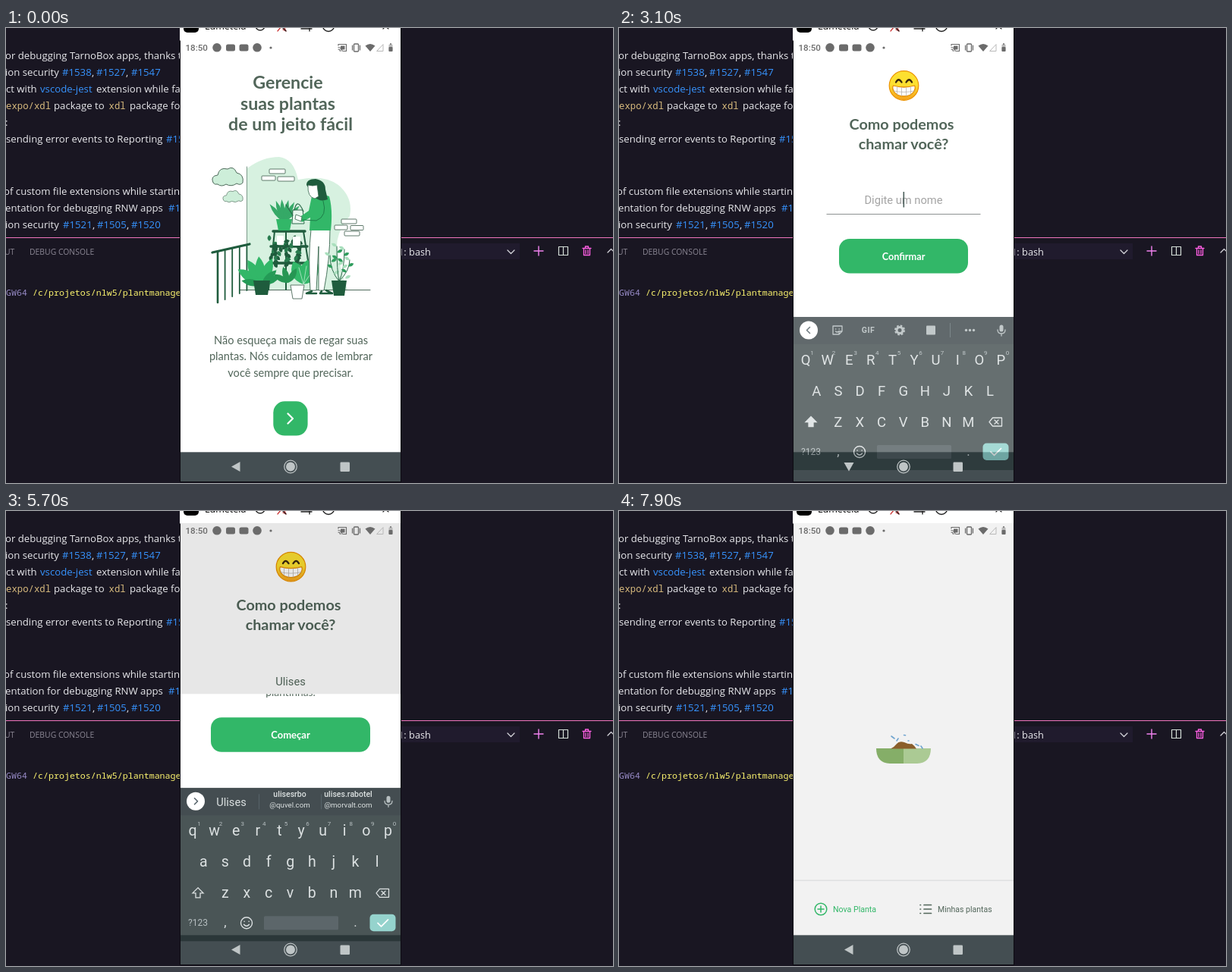
Write an HTML page that moves like this. It is 800 px wide and 600 px high and loops after 8000 ms.

```html
<!DOCTYPE html>
<html lang="pt-BR">
<head>
<meta charset="utf-8">
<title>Plant manager demo</title>
<style>
html, body { margin: 0; width: 100%; height: 100%; overflow: hidden; background: #191622; }
svg { display: block; width: 800px; height: 600px; }
.ui { font-family: "Open Sans", "Noto Sans", sans-serif; }
.mono { font-family: "Noto Sans Mono", monospace; }
.title { font-family: Lato, sans-serif; font-weight: 700; }
.body { font-family: Lato, sans-serif; }
.rob { font-family: Roboto, sans-serif; }
.mid { text-anchor: middle; }
.bold { font-weight: 700; }
.line { fill: none; stroke-linecap: round; stroke-linejoin: round; }
</style>
</head>
<body>
<svg id="stage" viewBox="0 0 800 600"></svg>
<script>
const NAME = 'Ulises';
const GREEN = '#32b768', INK = '#52665a', DARK = '#1f5c3d', LINK = '#3794ff', CODE = '#d7ba7d';
const $ = id => document.getElementById(id);

const text = (x, y, size, str, cls, fill, more = '') =>
  `<text x="${x}" y="${y}" font-size="${size}" class="${cls}" fill="${fill}" ${more}>${str}</text>`;
const rect = (x, y, w, h, fill, r = 0, more = '') =>
  `<rect x="${x}" y="${y}" width="${w}" height="${h}" rx="${r}" fill="${fill}" ${more}/>`;
const disc = (x, y, r, fill, more = '') => `<circle cx="${x}" cy="${y}" r="${r}" fill="${fill}" ${more}/>`;
const shape = (d, fill, more = '') => `<path d="${d}" fill="${fill}" ${more}/>`;
const line = (d, color, w = 1) => `<path d="${d}" class="line" stroke="${color}" stroke-width="${w}"/>`;
const group = (id, inner, more = '') => `<g id="${id}" ${more}>${inner}</g>`;
const button = (id, x, y, w, label, size, base) => group(id,
  rect(x, y, w, 45.5, GREEN, 14) + text(375, base, size, label, 'title mid', '#fff'));

function editor() {
  const white = '#e8e8ec', parts = [
    [-1, 41, 'or debugging TarnoBox apps, thanks to'],
    [-1, 63, 'ion security'], [74, 63, '#1538', LINK], [113, 63, ','], [119, 63, '#1527', LINK],
    [158, 63, ','], [165, 63, '#1547', LINK],
    [0, 85, 'ct with'], [45, 85, 'vscode-jest', LINK], [119, 85, 'extension while fa'],
    [63, 107, 'package to'], [163, 107, 'package for'], [-1, 129, ':'],
    [0, 151, 'sending error events to Reporting'], [211, 151, '#1531', LINK],
    [-3, 220, 'of custom file extensions while starting'],
    [-1, 242, 'entation for debugging RNW apps'], [214, 242, '#1513', LINK],
    [-1, 264, 'ion security'], [75, 264, '#1521', LINK], [114, 264, ','], [120, 264, '#1505', LINK],
    [159, 264, ','], [165, 264, '#1520', LINK]];
  return rect(0, 0, 800, 600, '#191622')
    + parts.map(([x, y, s, c = white]) => text(x, y, 13.2, s, 'ui', c)).join('')
    + text(0, 107, 12.3, 'expo/xdl', 'mono', CODE) + text(135.5, 107, 12.3, 'xdl', 'mono', CODE)
    + rect(0, 276, 800, 1, '#f075bd')
    + text(-2, 299, 10.4, 'UT', 'ui', '#8b8794') + text(31, 299, 10.4, 'DEBUG CONSOLE', 'ui', '#8b8794')
    + text(0, 353, 11.65, 'GW64', 'mono', '#988bc7')
    + text(35, 353, 11.65, '/c/projetos/nlw5/plantmanager', 'mono', '#fbf36e')
    + rect(500, 284, 177, 21, '#201b2d') + text(517, 300, 12.8, '1: bash', 'ui', white)
    + line('M661 293l4.5 4.5l4.5-4.5', '#d8d8de', 1.2)
    + line('M702 288v12M696 294h12', '#f283f0', 1.4)
    + line('M728.5 288.5h12v11h-12zM734.5 288.5v11', '#d5dfd9', 1.2)
    + line('M760 290.5h11M763.5 290v-2h4v2M761.5 291v8.5h8v-8.5M764 293v4.5M767 293v4.5', '#ff5fe4', 1.3)
    + line('M793 296l4.5-4.5l4.5 4.5', '#d8d8de', 1.2);
}

function windowBar() {
  return rect(229, 0, 292, 599, '#0d0b12') + rect(229, 0, 291, 16.5, '#fff') + rect(234, -12, 20, 18, '#000', 5)
    + text(262, 2, 12.5, 'Lumetela', 'ui', '#000')
    + disc(335, -3, 6, 'none', 'stroke="#222" stroke-width="1.4"')
    + line('M358 4l5-6M366-2l3 6l-4-2', '#c33', 1.3) + line('M363-2l6 6', '#222', 1.2)
    + line('M389 1h14M400-2v6', '#222', 1.4)
    + disc(425, -3, 7.5, 'none', 'stroke="#222" stroke-width="1.4"')
    + line('M497 1l3-3l4 3', '#222', 1.2);
}

function statusBar() {
  const g = '#6b6b6b';
  return text(236.5, 30.2, 11.6, '18:50', 'rob', g, 'font-weight="500"')
    + disc(278, 25.8, 5.8, g) + rect(290, 21.5, 12, 9, g, 2.5) + rect(307.5, 21.5, 12, 9, g, 2.5)
    + disc(331, 25.8, 5.8, g) + disc(349, 26, 1.6, g)
    + line('M438 23v-1.5h10.5v9h-4M438 25.5a5 5 0 0 1 5 5M438 28a2.5 2.5 0 0 1 2.5 2.5', g, 1.2)
    + rect(441, 23.5, 5.5, 5, g)
    + rect(458.5, 21, 6, 10, 'none', 1, `stroke="${g}" stroke-width="1.4"`)
    + line('M456.5 23v6M466.5 23v6', g, 1.2)
    + shape('M473.5 23.5Q480 18.5 486.5 23.5L480 31z', g)
    + line('M489 30.5h8v-8.5z', '#b9b9b9', 1)
    + rect(504.5, 21.5, 5, 9.5, '#bbb', 1) + rect(504.5, 25, 5, 6, g, 1) + rect(506, 20.3, 2, 1.5, g);
}

const leaf = (x, y, len, angle, w, fill) => shape(
  `M0 0Q${w} ${-len / 2} 0 ${-len}Q${-w} ${-len / 2} 0 0`, fill,
  `transform="translate(${x} ${y}) rotate(${angle})"`);
const fan = (x, y, len, w, fill, angles) => angles.map(a => leaf(x, y, len, a, w, fill)).join('');
const brick = (x, y, w) => rect(x, y, w, 6, '#fff', 1, 'stroke="#4f6b5c" stroke-width=".9"');
const cloud = (x, y, k) => shape('M-19 8Q-23-1-13-2Q-11-13 0-10Q8-15 12-5Q22-3 20 8Q17 12 12 9Q5 14-2 10Q-8 14-13 10Q-17 11-19 8z',
  '#cdeed9', `stroke="#4f6b5c" stroke-width="1" transform="translate(${x} ${y}) scale(${k})"`);

function illustration() {
  let s = shape('M318 345V185Q338 170 360 170Q379 172 385 200Q420 193 438 207Q458 224 453 248Q436 268 436 288Q440 318 450 345z', '#d7f1e0')
    + line('M317.5 183V345', '#7c9a8a', 1) + line('M308 345.5H480', '#4f6b5c', 1)
    + cloud(292, 196, 1) + cloud(299, 222, .65)
    + brick(347, 186, 21) + brick(337, 195, 18) + brick(358, 196, 22)
    + brick(442, 252, 20) + brick(433, 260, 17) + brick(454, 260.5, 17) + brick(446, 268, 20);
  // railing
  s += line('M272 296L321 285', DARK, 3.2);
  for (let i = 0; i < 5; i++) s += line(`M${279 + i * 9.6} ${295 - i * 2.2}V${362 - i * 4}`, DARK, i ? 1.8 : 2.6);
  // stand with plants
  s += line('M354 268L346 345M392 268L404 345M369 268V345', DARK, 2)
    + line('M352 268H394M349 288H397M348 310H400', DARK, 3.4)
    + fan(366, 256, 30, 6, '#35a967', [-38, -20, -5, 12, 28, 44])
    + shape('M356 252h21l-3 15h-15z', GREEN)
    + shape('M378 240h13l2 18h-16z', '#e9f7ee', 'stroke="#2b6a4a" stroke-width="1"')
    + line('M378 247l-9-14M380 240q4-17 12 2', '#2b6a4a', 1.2);
  for (let i = 0; i < 44; i++)
    s += leaf(347 + i * 17 % 45, 281 + i * 11 % 31, 8, i * 47, 5, i % 3 ? DARK : '#2a7d50');
  s += rect(357, 274, 9, 12, '#fff', 1) + rect(378, 275, 10, 12, '#fff', 1);
  // floor plants
  s += fan(337, 338, 37, 13, GREEN, [-58, -30, -6, 22]) + fan(337, 338, 27, 9, '#249a56', [-80, 46, 66])
    + shape('M326 333h22l-3 19h-16z', DARK)
    + fan(392, 338, 33, 17, GREEN, [-24, 10, 36]) + line('M392 338l-6-22M392 338l4-24M392 338l12-18', '#bdebce', .8)
    + fan(372, 336, 22, 8, '#269653', [-60, -18, 30])
    + shape('M375 339h18l-3 18h-12z', '#fff', 'stroke="#4f6b5c" stroke-width=".9"');
  // gardener
  s += shape('M402 266L427 266Q427 305 419 346L412 346L412 288L409 346L401 346Q398 300 402 266z', '#fff', 'stroke="#37664d" stroke-width=".9"')
    + line('M403 347l-7 3h13M416 347l-2 3h16l-8-4', DARK, 2.6)
    + shape('M403 222Q416 217 426 222Q431 240 428 267L400 267L401 250L390 256L386 250L399 241z', GREEN)
    + line('M418 228Q424 248 409 254L391 253', '#1d7d48', 1)
    + shape('M382 246l8 3-1 6-8-3z', '#fff', 'stroke="#37664d" stroke-width=".8"')
    + shape('M396 207Q396 199 408 199Q421 201 421 213L424 226Q414 230 407 223z', DARK)
    + shape('M398 207Q404 209 410 207L412 222L407 225Q397 223 398 207z', '#fff', 'stroke="#37664d" stroke-width=".8"');
  // flowering plant
  const stems = [[427, 300], [436, 288], [446, 292], [453, 306]];
  for (const [x, y] of stems) {
    s += line(`M439 334Q${x} 320 ${x} ${y}`, '#2b6a4a', 1);
    for (let i = 0; i < 4; i++)
      s += leaf(x + (439 - x) * i / 7, y + i * 8, 8, i % 2 ? 65 : -60, 4, i % 3 ? '#2f9d5d' : '#a9dfbd');
  }
  return s + shape('M429 333h20l-3 20h-14z', DARK);
}

const emoji = (x, y, r) => `<g transform="translate(${x} ${y}) scale(${r / 20})">`
  + disc(0, 0, 19.3, 'url(#face)', 'stroke="#eb9200" stroke-width="1.2"')
  + line('M-10.5-4.5Q-7-11-3-4.5M3-4.5Q7-11 10.5-4.5', '#3b270d', 2.3)
  + shape('M-14 0Q0 4 14 0Q16 3 13 8Q9 14 0 14Q-9 14-13 8Q-16 3-14 0z', '#fff', 'stroke="#e68f06" stroke-width="1.3"')
  + line('M-13.5 7Q0 10 13.5 7M-9 1.5v9.5M-3 2.5v11M3 2.5v11M9 1.5v9.5', '#b9b3ac', .8) + '</g>';

const welcome = () =>
  text(371.5, 80, 23.2, 'Gerencie', 'title mid', INK) + text(371.5, 107.5, 23.2, 'suas plantas', 'title mid', INK)
  + text(375, 134.5, 23.2, 'de um jeito fácil', 'title mid', INK) + illustration()
  + text(375.5, 417, 14.6, 'Não esqueça mais de regar suas', 'body mid', INK)
  + text(375.5, 438, 14.6, 'plantas. Nós cuidamos de lembrar', 'body mid', INK)
  + text(375, 459.5, 14.6, 'você sempre que precisar.', 'body mid', INK)
  + group('go', rect(352.3, 492.3, 45.3, 45.3, GREEN, 15) + line('M371.5 508.5l6.5 6.5l-6.5 6.5', '#fff', 2.2));

const askName = () => emoji(375.5, 177, 20)
  + text(372.5, 234.5, 19.8, 'Como podemos', 'title mid', INK) + text(375, 260.5, 19.8, 'chamar você?', 'title mid', INK)
  + text(375, 333, 14.7, '', 'rob mid', '#a4a4a4', 'id="field"')
  + rect(0, 317, 1.6, 20.5, '#008577', 0, 'id="caret"')
  + rect(273.5, 346, 203, 1, '#ccc', 0, 'id="rule"')
  + button('confirm', 290, 379, 170, 'Confirmar', 12.7, 407);

const ready = () => emoji(375.3, 211, 34.8)
  + text(375, 284, 17.1, 'Prontinho', 'title mid', INK)
  + text(375, 316, 13.8, 'Agora vamos começar a cuidar das suas', 'body mid', INK)
  + text(375, 335.5, 13.8, 'plantinhas.', 'body mid', INK)
  + button('start', 270, 364, 210, 'Começar', 13, 391.5);

const loading = () =>
  group('pot', shape('M339 313h36v20h-18Q339 332 339 313z', '#85ae68') + shape('M375 313h36Q411 332 393 333h-18z', '#abca94'))
  + group('soil', shape('M358 313.5Q363 311 366 307Q369 303 376 305Q382 308 386 307Q390 310 392 313.5z', '#8a5e2b'))
  + group('drops', line('M359 297l4 3M375.5 295.5l2 .3M366 303l2-3M391 307.5l4 2M398 310l2 3M381 303h1', '#6fa4cf', 1.6))
  + rect(230, 486.5, 290, 1.4, '#dedfe0')
  + disc(266, 525, 7.8, 'none', `stroke="${GREEN}" stroke-width="1.5"`) + line('M266 521v8M262 525h8', GREEN, 1.5)
  + text(282, 529, 10.6, 'Nova Planta', 'rob', GREEN)
  + [519.5, 525, 530.5].map(y => line(`M402 ${y}h9.5M397 ${y}h.5`, INK, 1.7)).join('')
  + text(420, 529, 10.5, 'Minhas plantas', 'rob', INK);

// keyboard, in its resting place
const keyRows = [['qwertyuiop', 246, 414], ['asdfghjkl', 260.3, 455], ['zxcvbnm', 288.8, 496]];
const PITCH = 28.6, KEY = '#d5dbdc';
function keyPlace(ch) {
  const [row, x, y] = keyRows.find(r => r[0].includes(ch));
  return [x + row.indexOf(ch) * PITCH, y];
}
const letters = up => keyRows.map(([row]) => [...row].map(ch => {
  const [x, y] = keyPlace(ch);
  return text(x, y + 6.5, up ? 18.5 : 19.5, up ? ch.toUpperCase() : ch, 'rob mid', KEY);
}).join('')).join('') + shape('M253 489.5l7 7h-4v6h-6v-6h-4z', up ? KEY : 'none', `stroke="${KEY}" stroke-width="1.3"`);
const toggle = d => disc(250, 375.5, 12, '#fff') + line(d, '#37474f', 1.6);

function keyboard() {
  const soft = '#a9b3b5';
  return rect(230, 358, 290, 202, '#263335') + rect(230, 358, 290, 36, '#1f2a2e')
    + group('tools', toggle('M251.5 371.5l-4 4l4 4')
      + line('M282 370h12v7l-4 4h-8zM294 377h-4v4M285.5 374h.3M290 374h.3M285.5 377q2 2 4 0', soft, 1.3)
      + text(328.5, 379.3, 10.5, 'GIF', 'rob mid bold', soft, 'letter-spacing=".5"')
      + disc(370, 375.5, 4, 'none', `stroke="${soft}" stroke-width="3"`)
      + disc(370, 375.5, 6, 'none', `stroke="${soft}" stroke-width="2" stroke-dasharray="2.6 2.112"`)
      + rect(405, 369.5, 12, 12, soft, 1) + rect(436, 366, 1, 19, '#46545a')
      + [457.5, 462.5, 467.5].map(x => disc(x, 375.5, 1.7, soft)).join(''))
    + group('words', toggle('M248.5 371.5l4 4l-4 4') + rect(333, 366, 1, 20, '#35444a') + rect(415, 366, 1, 20, '#35444a')
      + text(297, 382, 14.6, '', 'rob mid', KEY, 'id="left"') + text(374, 382, 14.4, '', 'rob mid bold', '#fff', 'id="best"')
      + group('mailA', mail('ulisesrbo', '@quvel.com')) + group('mailB', mail('ulises.rabotel', '@morvalt.com'), 'transform="translate(451)"'))
    + rect(501.5, 368.5, 5, 9, soft, 2.5) + line('M499 375q0 5 5 5q5 0 5-5M504 380v3', soft, 1.3)
    + [...'1234567890'].map((n, i) => text(254.5 + i * PITCH, 408, 8, n, 'rob mid', soft)).join('')
    + group('lower', letters(false)) + group('upper', letters(true))
    + line('M488 496.5l4.5-5.5h12v11h-12zM495 494l5 5M500 494l-5 5', KEY, 1.3)
    + text(253, 540, 12, '?123', 'rob mid', soft) + text(289, 541, 17, ',', 'rob mid', KEY) + text(460.5, 541, 17, '.', 'rob mid', KEY)
    + disc(317, 536, 7.5, 'none', `stroke="${KEY}" stroke-width="1.4"`)
    + line('M314 534h.2M320 534h.2M313.5 538q3.5 4 7 0', KEY, 1.5)
    + rect(340, 527, 98, 18, '#3c484c', 1.5)
    + rect(479.5, 524.5, 34, 22.5, '#80cbc4', 5) + line('M490 536l4.5 4.5l9-9', '#fff', 1.7)
    + group('pop', rect(-15, -73, 30, 90, '#3a484d', 3) + text(0, -41, 19.5, '', 'rob mid', '#fff', 'id="popKey"'));
}
function mail(user, host) {
  return text(0, 369.8, 10.5, user, 'rob mid', KEY, 'font-weight="500"') + text(0, 383.3, 9.7, host, 'rob mid', KEY);
}

const navIcons = () => {
  const c = '#bfc5c6';
  return group('back', shape('M-6 0L5.5-6.5V6.5z', c))
    + disc(375, 578.5, 8.3, 'none', `stroke="${c}" stroke-width="1.2"`) + disc(375, 578.5, 6, c)
    + rect(440.5, 572.5, 12.5, 12.5, c, 1.2);
};

const screen = (i, inner, bg) => `<g id="screen${i}" clip-path="url(#clip${i})">` + rect(230, 16, 290, 543, bg)
  + group('page' + i, inner) + rect(230, 16, 290, 543, '#000', 0, `id="dim${i}"`) + '</g>';

$('stage').innerHTML = '<defs><linearGradient id="face" x2="0" y2="1"><stop offset=".45" stop-color="#fde030"/><stop offset="1" stop-color="#f5a11c"/></linearGradient>'
  + [0, 1, 2, 3].map(i => `<clipPath id="clip${i}"><rect id="win${i}" x="230" y="16" width="290" height="543"/></clipPath>`).join('') + '</defs>'
  + editor() + windowBar() + rect(230, 16, 290, 544, '#fff')
  + screen(0, welcome(), '#fff') + screen(1, askName(), '#fff') + screen(2, ready(), '#fff') + screen(3, loading(), '#f2f2f2')
  + statusBar() + rect(230, 559.3, 290, 38.7, '#444e52') + group('keyboard', keyboard()) + navIcons();

const set = (id, name, value) => $(id).setAttribute(name, value);
const show = (id, on) => set(id, 'display', on ? 'inline' : 'none');
const clamp = v => Math.max(0, Math.min(1, v));

// cubic-bezier(.20833, .82, .25, 1)
function ease(x) {
  if (x <= 0 || x >= 1) return clamp(x);
  const curve = (s, a, b) => 3 * a * s * (1 - s) ** 2 + 3 * b * s * s * (1 - s) + s ** 3;
  let lo = 0, hi = 1;
  for (let i = 0; i < 24; i++) {
    const mid = (lo + hi) / 2;
    if (curve(mid, .20833, .25) < x) lo = mid; else hi = mid;
  }
  return curve(lo, .82, 1);
}

// a button held between two times; its face and label fade separately
function press(id, t, down, up) {
  const alpha = t < up ? 1 - .8 * clamp((t - down) / 100) : .2 + .8 * clamp((t - up) / 250);
  for (const part of $(id).children) part.setAttribute('opacity', alpha);
}

const stalls = [[5100, 5300], [5700, 6200], [7200, 7400]];
const opens = [-1000, 2113, 5662, 6850];

function render(ms) {
  let t = Math.floor(ms / 100) * 100;
  for (const [a, b] of stalls) if (t >= a && t < b) t = a;

  const typing = t >= 3100 && t < 6200;
  const height = typing ? 342 : 543;
  const reveal = opens.map(start => ease((t - start) / 425));
  reveal.forEach((p, i) => {
    const next = reveal[i + 1] || 0, top = 16 + height * (1 - p);
    const lift = typing && (i === 1 || i === 2) ? -101 : 0;
    show('screen' + i, p > 0 && next < 1);
    set('win' + i, 'y', top);
    set('page' + i, 'transform', `translate(0 ${height * (.041 * (1 - p) - .02 * next) + lift})`);
    set('dim' + i, 'opacity', .1 * clamp(next / .36));
  });

  press('go', t, 1400, 1800);
  press('confirm', t, 4750, 5050);
  press('start', t, 6300, 6900);

  const count = t < 3600 ? 0 : t < 4300 ? Math.min(3, (t - 3500) / 100) : 6;
  const typed = NAME.slice(0, count), focus = t >= 2800 && t < 5300, field = $('field');
  field.textContent = typed || 'Digite um nome';
  set('field', 'fill', typed ? INK : '#a4a4a4');
  set('field', 'text-decoration', typed && focus ? 'underline' : 'none');
  show('caret', focus);
  set('caret', 'x', typed ? 375 + field.getComputedTextLength() / 2 : 374.5);
  set('caret', 'fill', t < 3200 ? '#4d605c' : '#008577');
  set('rule', 'fill', focus ? '#8d9291' : '#ccc');

  const [drop, alpha] = t < 3200 ? [23, .7] : t < 3300 ? [6, .92] : t < 5700 ? [0, 1] : [7.3, .83];
  show('keyboard', typing);
  set('keyboard', 'transform', `translate(0 ${drop})`);
  set('keyboard', 'opacity', alpha);
  show('upper', !typed);
  show('lower', typed);
  show('tools', !typed);
  show('words', typed);
  const done = t >= 5300;
  $('left').textContent = done ? NAME : typed.slice(0, -1);
  $('best').textContent = done ? '' : typed;
  set('mailA', 'transform', `translate(${done ? 374 : 451})`);
  show('mailB', done);

  const hit = { 3600: 'u', 3700: 'l', 4300: 's' }[t];
  show('pop', hit);
  if (hit) {
    set('pop', 'transform', `translate(${keyPlace(hit)})`);
    $('popKey').textContent = hit;
  }
  set('back', 'transform', `translate(303 578.5) rotate(${t >= 2900 && t < 5700 ? -90 : 0})`);

  const grow = clamp((t - 7300) / 300), wet = clamp((t - 7600) / 300);
  set('pot', 'transform', `translate(375 333) scale(${grow}) translate(-375 -333)`);
  set('soil', 'transform', `translate(375 313.5) scale(1 ${wet}) translate(-375 -313.5)`);
  set('drops', 'transform', `translate(375 313) scale(${wet}) translate(-375 -313)`);
}

function frame(now) {
  render(now % 8000);
  requestAnimationFrame(frame);
}
render(0);
requestAnimationFrame(frame);
</script>
</body>
</html>
```
